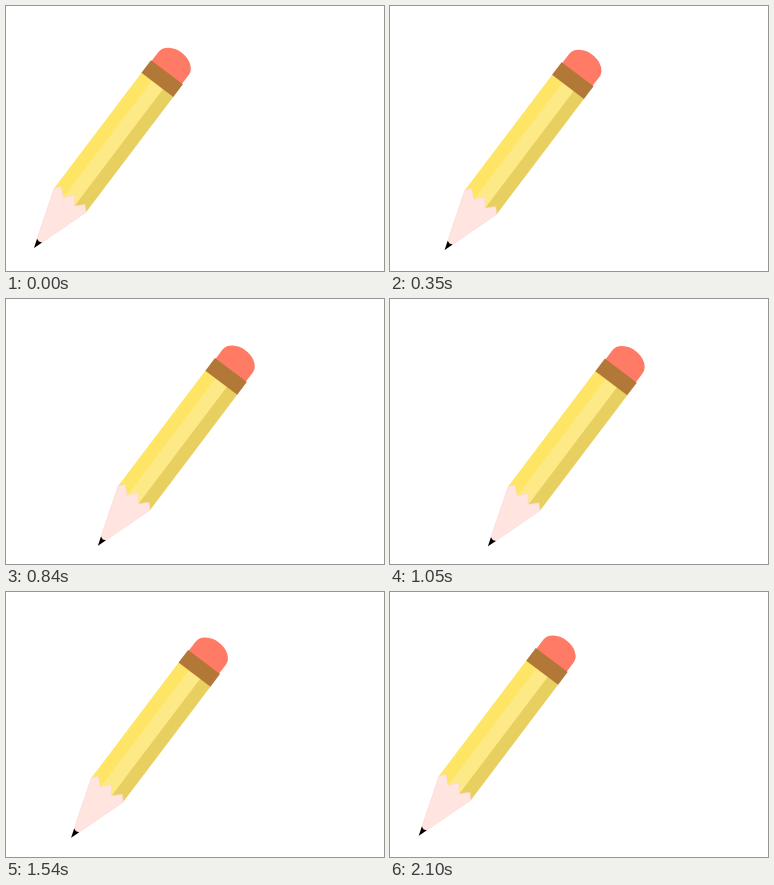
Write an HTML page that moves like this. It is 378 px wide and 265 px high and loops after 2170 ms.

```html
<!DOCTYPE html>
<html lang="en">
<head>
<meta charset="utf-8">
<title>Pencil</title>
<style>
  html, body { margin: 0; width: 100%; height: 100%; overflow: hidden; background: #fff; }
  svg { display: block; width: 378px; height: 265px; }
</style>
</head>
<body>
<svg viewBox="0 0 378 265">
  <!-- Upright pencil with its tip at the origin -->
  <g id="pencil">
    <path fill="#ff7b65" d="M-19-219V-231.4A19 13.5 0 0 1 19-231.4V-219z"/>
    <path fill="#ffe566" d="M-20-205H-6V-57H-20z"/>
    <path fill="#fdea87" d="M-7-205H8V-57H-7z"/>
    <path fill="#e7d060" d="M7-205H20V-57H7z"/>
    <path fill="#b27837" d="M-20-220.4H20V-204.5H-20z"/>
    <path fill="#fff" d="M-21-56V-60H-20L-7-57H7L20-60H21V-56z"/>
    <path fill="#ffe4e0" stroke="#fbd3cf" stroke-width=".5" stroke-linejoin="round"
          d="M0 0L-20-60L-15.5-65.5L-7-58L0-66.5L7-58L14.5-65.5L20-60z"/>
    <path d="M0 0L-3.1-9.2L0-8L3.1-9.2z"/>
  </g>
</svg>
<script>
  const STEP = 70, STEPS = 31;
  // [step, x offset, y offset]
  const keys = [[0, 0, 0], [14, 74.6, 5.6], [26, 18.4, 2.8], [30, 0.8, 1.8]];
  const pencil = document.getElementById('pencil');
  const start = performance.now();

  function offset(step) {
    const i = Math.max(1, keys.findIndex(key => key[0] >= step));
    const a = keys[i - 1], b = keys[i];
    const p = (step - a[0]) / (b[0] - a[0]);
    return [1, 2].map(k => a[k] + (b[k] - a[k]) * p);
  }

  function draw(now) {
    const step = Math.floor(Math.max(0, now - start) / STEP) % STEPS;
    const [x, y] = offset(step);
    pencil.setAttribute('transform', `translate(${28 + x} ${242 + y}) rotate(37.1)`);
    requestAnimationFrame(draw);
  }
  draw(start);
</script>
</body>
</html>
```
